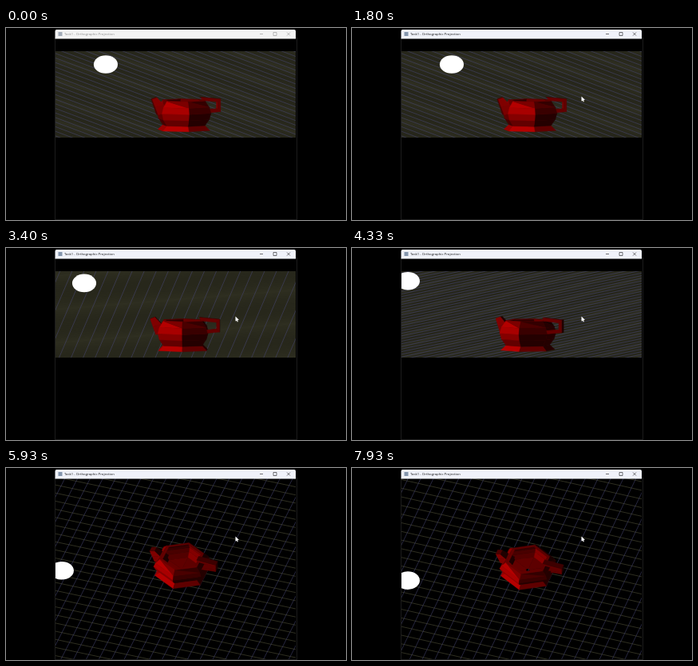
An HTML page with a canvas that plays this animation: 426 by 240 pixels, repeating every 8 s.

```html
<!DOCTYPE html>
<html lang="en">
<head>
<meta charset="utf-8">
<title>Orthographic Projection</title>
<style>
html, body { margin: 0; width: 100%; height: 100%; overflow: hidden; background: #000; }
canvas { display: block; width: 100vw; height: 100vh; }
</style>
</head>
<body>
<canvas id="stage"></canvas>
<script>
const W = 426, H = 240, LOOP = 8000, FOCUS_TIME = 1800;
const LEFT = 62, TOP = 13, WIDE = 301, TALL = 226;
const canvas = document.getElementById('stage');
const ctx = canvas.getContext('2d');

// One world unit in stage pixels; the window stretches x by 4:3
const UNIT = 11.3, STRETCH = 4 / 3, CX = 222, CY = 126;
const LIGHT = [-8 * UNIT, 8 * UNIT, 8 * UNIT];
const GRID_LINES = 110;
const NEAR = 121, FAR = 1066;
const RAD = Math.PI / 180;

// Camera angles in degrees over time
const YAW = [[2150, -10.3], [2530, -20.5], [3000, -20.5], [3700, 18.2]];
const PITCH = [[5025, 5.2], [6800, 110], [7150, 110], [7930, 65.3]];

const mix = (a, b, u) => a + (b - a) * u;

function at(keys, t) {
  const i = keys.findIndex(k => t < k[0]);
  if (i === 0) return keys[0][1];
  if (i < 0) return keys[keys.length - 1][1];
  const [t0, a] = keys[i - 1], [t1, b] = keys[i];
  return mix(a, b, (t - t0) / (t1 - t0));
}

// Vectors are [x, height, z], z towards the viewer
const sub = (a, b) => a.map((v, i) => v - b[i]);
const dot = (a, b) => a[0] * b[0] + a[1] * b[1] + a[2] * b[2];
const cross = (a, b) => [
  a[1] * b[2] - a[2] * b[1],
  a[2] * b[0] - a[0] * b[2],
  a[0] * b[1] - a[1] * b[0]
];
const unit = v => { const n = Math.hypot(...v) || 1; return v.map(c => c / n); };
const middle = pts => [0, 1, 2].map(i => pts.reduce((s, p) => s + p[i], 0) / pts.length);

const faces = [];

function addFace(pts, gain = 1, inside = null) {
  const mid = middle(pts);
  let normal = unit(cross(sub(pts[1], pts[0]), sub(pts[2], pts[0])));
  if (inside && dot(normal, sub(mid, inside)) < 0) normal = normal.map(v => -v);
  const lit = Math.max(0, dot(normal, unit(sub(LIGHT, mid))));
  faces.push({ pts, mid, normal, color: `rgb(${Math.round((36 + 150 * lit) * gain)},0,0)` });
}

// The pot stands slightly in front of the pivot
const SHIFT = 4;
const corner = (r, h, i) => {
  const a = (30 + 60 * i) * RAD;
  return [r * Math.cos(a), h, r * Math.sin(a) + SHIFT];
};

function addBand([r0, h0], [r1, h1], gain, split = false) {
  for (let i = 0; i < 6; i++) {
    const a = corner(r0, h0, i), b = corner(r0, h0, i + 1);
    const c = corner(r1, h1, i + 1), d = corner(r1, h1, i);
    if (split) {
      addFace([a, b, d], gain * .7);
      addFace([b, c, d], gain);
    } else addFace([a, b, c, d], gain);
  }
}

// Six-sided pot: a bulging wall, a flared foot and a narrower inside
function addBody() {
  const steps = 4;
  const wall = k => [21 + 6 * Math.sin(Math.PI * k / steps), mix(36, 5, k / steps)];
  const lining = k => { const [r, h] = wall(k); return [r * .88, h]; };
  for (let k = 0; k < steps; k++) {
    addBand(wall(k), wall(k + 1), 1, k === 0);
    addBand(lining(k + 1), lining(k), .75);
  }
  addBand(wall(steps), [26, -1], 1);
  addBand(lining(0), wall(0), 1);
  addBand([2, 5], lining(steps), .8);
}

// Square tube along path(u) = [x, height] with half thickness and half width
function addTube(path, thick, width, steps) {
  const section = u => {
    const [x, h] = path(u), [x0, h0] = path(u - .01), [x1, h1] = path(u + .01);
    const len = Math.hypot(x1 - x0, h1 - h0), t = thick(u), w = width(u);
    const nx = (h1 - h0) / len * t, nh = (x0 - x1) / len * t;
    return [[1, -w], [1, w], [-1, w], [-1, -w]]
      .map(([s, z]) => [x + s * nx, h + s * nh, z + SHIFT]);
  };
  for (let k = 0; k < steps; k++) {
    const a = section(k / steps), b = section((k + 1) / steps);
    const inside = middle([...a, ...b]);
    for (let j = 0; j < 4; j++) {
      const n = (j + 1) % 4;
      addFace([a[j], a[n], b[n], b[j]], .85, inside);
    }
    if (k === steps - 1) addFace(b, .6, inside);
  }
}

addBody();
addTube(u => [-20 - 8.5 * u, 21 + 18 * u], u => mix(6, 2.5, u), u => mix(5, 3, u), 2);
addTube(u => {
  const a = mix(120, -120, u) * RAD;
  return [23 + 13 * Math.cos(a), 29.5 + 9.5 * Math.sin(a)];
}, () => 2.2, () => 3, 3);

function makeCamera(t) {
  const yaw = at(YAW, t) * RAD, pitch = at(PITCH, t) * RAD;
  const cy = Math.cos(yaw), sy = Math.sin(yaw), cp = Math.cos(pitch), sp = Math.sin(pitch);
  return {
    slope: Math.abs(sp / cp),
    view: [sy * cp, sp, cy * cp],
    project: ([x, h, z]) => [
      CX + STRETCH * (x * cy - z * sy),
      CY - h * cp + (x * sy + z * cy) * sp
    ]
  };
}

function drawGrid(cam) {
  ctx.save();
  // Near and far planes cut the ground along level lines
  const top = CY - FAR * cam.slope;
  ctx.beginPath();
  ctx.rect(LEFT, top, WIDE, (FAR + NEAR) * cam.slope);
  ctx.clip();
  ctx.lineWidth = .75;
  const reach = GRID_LINES * UNIT;
  const family = (color, place) => {
    ctx.beginPath();
    for (let i = -GRID_LINES; i <= GRID_LINES; i++) {
      ctx.moveTo(...cam.project(place(i * UNIT, -reach)));
      ctx.lineTo(...cam.project(place(i * UNIT, reach)));
    }
    ctx.strokeStyle = color;
    ctx.stroke();
  };
  family('rgba(84,84,60,.75)', (d, s) => [s, 0, d]);
  family('rgba(70,70,112,.75)', (d, s) => [d, 0, s]);
  ctx.restore();
}

function drawLight(cam) {
  ctx.fillStyle = '#fff';
  ctx.beginPath();
  ctx.ellipse(...cam.project(LIGHT), UNIT * STRETCH, UNIT, 0, 0, Math.PI * 2);
  ctx.fill();
}

function drawTeapot(cam) {
  ctx.lineWidth = .4;
  ctx.lineJoin = 'round';
  faces
    .filter(f => dot(f.normal, cam.view) > 0)
    .sort((a, b) => dot(a.mid, cam.view) - dot(b.mid, cam.view))
    .forEach(f => {
      ctx.beginPath();
      f.pts.forEach(p => ctx.lineTo(...cam.project(p)));
      ctx.closePath();
      ctx.fillStyle = ctx.strokeStyle = f.color;
      ctx.fill();
      ctx.stroke();
    });
}

function drawWindow(active) {
  ctx.strokeStyle = '#1c1c1c';
  ctx.lineWidth = 1;
  ctx.strokeRect(LEFT - .5, TOP - .5, WIDE + 2, TALL + 1);
  ctx.fillStyle = active ? '#f0f2fa' : '#f3f3f3';
  ctx.beginPath();
  ctx.roundRect(LEFT - .5, 2, WIDE + .5, 11.5, [2, 2, 0, 0]);
  ctx.fill();

  ctx.fillStyle = active ? '#8496ad' : '#a3acb8';
  ctx.fillRect(65.5, 5, 5, 5);
  ctx.fillStyle = ctx.strokeStyle = active ? '#1a1a1a' : '#909090';
  ctx.font = '4.3px "Open Sans", "Noto Sans", sans-serif';
  ctx.fillText('Task1 - Orthographic Projection', 73, 9.2);

  // Minimise, maximise, close
  const y = 7.5, s = 2;
  ctx.lineWidth = .6;
  ctx.beginPath();
  ctx.moveTo(320 - s, y);
  ctx.lineTo(320 + s, y);
  ctx.rect(337 - s, y - s, 2 * s, 2 * s);
  for (const d of [-s, s]) {
    ctx.moveTo(354 - s, y - d);
    ctx.lineTo(354 + s, y + d);
  }
  ctx.stroke();
}

function drawCursor() {
  ctx.fillStyle = ctx.strokeStyle = '#fff';
  ctx.lineWidth = 1.1;
  ctx.fill(new Path2D('M287.5 85.5v6l4.3-1.7z'));
  ctx.stroke(new Path2D('M288.8 89l1.6 3.3'));
}

function draw(t) {
  const dpr = window.devicePixelRatio || 1;
  const w = Math.round(innerWidth * dpr), h = Math.round(innerHeight * dpr);
  if (canvas.width !== w || canvas.height !== h) {
    canvas.width = w;
    canvas.height = h;
  }
  ctx.setTransform(w / W, 0, 0, h / H, 0, 0);
  ctx.fillStyle = '#000';
  ctx.fillRect(0, 0, W, H);

  const cam = makeCamera(t), active = t >= FOCUS_TIME;
  ctx.save();
  ctx.beginPath();
  ctx.rect(LEFT, TOP, WIDE, TALL);
  ctx.clip();
  drawGrid(cam);
  drawLight(cam);
  drawTeapot(cam);
  ctx.restore();
  drawWindow(active);
  if (active) drawCursor();
}

const start = performance.now();
function tick() {
  draw((performance.now() - start) % LOOP);
  requestAnimationFrame(tick);
}
tick();
</script>
</body>
</html>
```
